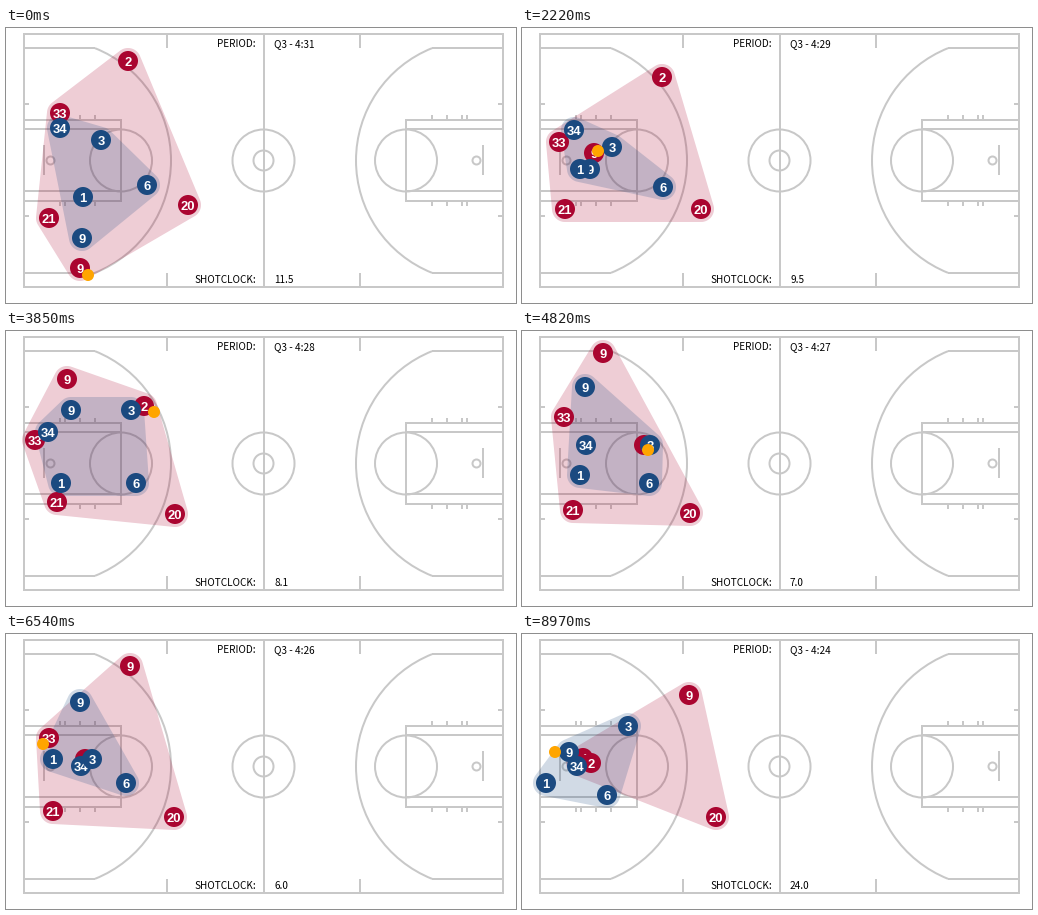
A matplotlib script that plays this animation: 510x275 px, repeating every 9.12 s.

```python
import numpy as np
import matplotlib.pyplot as plt
from matplotlib.animation import FuncAnimation
from matplotlib.patches import Arc, Circle, Polygon

W, H, DPI = 510, 275, 100
LOOP, TICK = 9120, 40
GREY, RED, BLUE, ORANGE = "#c8c8c8", "#aa0530", "#1b4a80", "#ffa500"
MID_X, MID_Y = 257.5, 132.5
HULL_R, DOT_R, BALL_R = 13, 10, 6

# The positions advance in 64 uneven steps per loop.
GROUPS = [(130, 1070), (1200, 2220), (2350, 3310), (3440, 4400),
          (4530, 5560), (5690, 6670), (6810, 7820), (7970, 8970)]
STARTS = np.concatenate([[0]] + [np.linspace(a, b, 8) for a, b in GROUPS])
STEPS = np.arange(len(STARTS))
KEYS = np.array([0, 16, 28, 35, 47, 57, 64])

# Waypoints at KEYS; later players are drawn on top.
REDS = {
    "33": [(54, 85), (37, 114), (29, 109), (42, 86), (43, 104), (55, 110), (61, 124)],
    "21": [(43, 190), (43, 181), (51, 171), (51, 179), (47, 177), (64, 128), (57, 129)],
    "20": [(182, 177), (179, 181), (169, 183), (168, 182), (168, 183), (175, 181), (194, 183)],
    "2": [(122, 33), (140, 49), (138, 75), (122, 114), (79, 125), (64, 128), (69, 129)],
    "9": [(74, 240), (72, 125), (61, 48), (81, 22), (124, 32), (150, 48), (167, 61)],
}
BLUES = {
    "34": [(54, 100), (52, 102), (42, 101), (64, 114), (75, 132), (66, 115), (55, 132)],
    "9": [(76, 210), (68, 141), (65, 79), (63, 56), (74, 68), (60, 127), (47, 118)],
    "1": [(77, 169), (58, 141), (55, 152), (58, 144), (47, 125), (41, 144), (24, 149)],
    "3": [(95, 112), (90, 119), (125, 79), (128, 114), (86, 125), (95, 113), (106, 92)],
    "6": [(141, 157), (141, 159), (130, 152), (127, 152), (120, 149), (93, 159), (85, 161)],
}


def track(points):
    """Monotone cubic path through the waypoints, sampled at every step."""
    p = np.array(points, float)
    h = np.diff(KEYS)[:, None]
    d = np.diff(p, axis=0) / h
    prod, total = d[:-1] * d[1:], d[:-1] + d[1:]
    inner = np.where(prod > 0, 2 * prod / np.where(total == 0, 1, total), 0)
    m = np.vstack([d[:1], inner, d[-1:]])
    i = np.clip(np.searchsorted(KEYS, STEPS, "right") - 1, 0, len(KEYS) - 2)
    t = ((STEPS - KEYS[i])[:, None]) / h[i]
    return ((1 + 2 * t) * (1 - t) ** 2 * p[i] + t * (1 - t) ** 2 * h[i] * m[i]
            + t * t * (3 - 2 * t) * p[i + 1] + t * t * (t - 1) * h[i] * m[i + 1])


red_paths = {n: track(p) for n, p in REDS.items()}
blue_paths = {n: track(p) for n, p in BLUES.items()}

# Who has the ball from which step, and where it is held.
HOLDS = [(0, red_paths["9"], (8, 7)), (16, red_paths["9"], (4, -2)),
         (20, red_paths["9"], (4, -2)), (25, red_paths["2"], (10, 6)),
         (28, red_paths["2"], (10, 6)), (35, red_paths["2"], (4, 5)),
         (43, red_paths["2"], (4, 5)), (47, red_paths["33"], (-6, 6)),
         (57, blue_paths["1"], (7, 1)), (64, blue_paths["9"], (-14, 0))]


def ball_at(step):
    for (s0, path0, off0), (s1, path1, off1) in zip(HOLDS, HOLDS[1:]):
        if step <= s1:
            w = (step - s0) / (s1 - s0)
            return (1 - w) * (path0[step] + off0) + w * (path1[step] + off1)


def clocks(step):
    shot = np.interp(step, [0, 8, 16, 28, 35, 47, 48, 57, 64],
                     [11.5, 11.02, 9.5, 8.1, 7.02, 6.03, 6, 4.97, 4.2])
    game = int(260 + shot)
    if step >= 61:
        shot = 24
    return f"Q3 - {game // 60}:{game % 60:02d}", f"{shot:.1f}"


ANGLES = np.linspace(0, 2 * np.pi, 240, endpoint=False)
DIRS = np.column_stack([np.cos(ANGLES), np.sin(ANGLES)])


def rounded_hull(points):
    """Convex hull of equal discs, from the farthest point in each direction."""
    return points[np.argmax(DIRS @ points.T, axis=1)] + HULL_R * DIRS


# The small margin keeps float rounding from losing a pixel.
fig = plt.figure(figsize=((W + 0.01) / DPI, (H + 0.01) / DPI), dpi=DPI,
                 facecolor="white")
ax = fig.add_axes([0, 0, 1, 1])
ax.set_xlim(0, W)
ax.set_ylim(H, 0)
ax.axis("off")


def px(size):
    return size * 72 / DPI


def line(*pts):
    ax.plot(*zip(*pts), color=GREY, lw=px(2), zorder=1,
            solid_capstyle="butt", solid_joinstyle="miter")


def ring(x, y, r):
    ax.add_patch(Circle((x, y), r, fill=False, ec=GREY, lw=px(2), zorder=1))


def half_court(fx, turn):
    line((fx(18), 20), (fx(89), 20))
    line((fx(18), 245), (fx(89), 245))
    a = np.degrees(np.arctan2(112.5, 45))
    ax.add_patch(Arc((fx(44), MID_Y), 242, 242, theta1=turn - a, theta2=turn + a,
                     ec=GREY, lw=px(2), zorder=1))
    for top, bottom in [(92, 173), (101.5, 163.5)]:
        line((fx(18), top), (fx(115), top))
        line((fx(18), bottom), (fx(115), bottom))
    line((fx(115), 91), (fx(115), 174))
    ring(fx(115), MID_Y, 31)
    ring(fx(44.5), MID_Y, 4)
    line((fx(38), 117), (fx(38), 147))
    for x in (54, 59, 74, 89):
        line((fx(x), 87), (fx(x), 92))
        line((fx(x), 173), (fx(x), 178))
    for y in (76, 188):
        line((fx(18), y), (fx(23), y))
    line((fx(161), 6), (fx(161), 20))
    line((fx(161), 245), (fx(161), 259))


line((18, 6), (497, 6), (497, 259), (18, 259), (18, 5))
line((MID_X, 6), (MID_X, 259))
ring(MID_X, MID_Y, 31)
ring(MID_X, MID_Y, 10)
half_court(lambda x: x, 0)
half_court(lambda x: 515 - x, 180)


def label(x, y, text, ha):
    return ax.text(x, y, text, ha=ha, va="baseline", color="black",
                   family="Noto Sans CJK JP", fontsize=px(10), zorder=2)


label(250, 19, "PERIOD:", "right")
label(250, 255, "SHOTCLOCK:", "right")
period = label(268, 19, "", "left")
shot_clock = label(268, 255, "", "left")


class Team:
    def __init__(self, paths, color, z):
        self.paths = np.stack(list(paths.values()), axis=1)
        self.hull = ax.add_patch(Polygon(np.zeros((3, 2)), fc=color, ec="none",
                                         alpha=0.2, zorder=3 + z / 100))
        self.dots, self.texts = [], []
        for i, name in enumerate(paths):
            self.dots.append(ax.add_patch(Circle((0, 0), DOT_R, fc=color, ec="none",
                                                 zorder=z + i)))
            self.texts.append(ax.text(0, 0, name, ha="center", va="baseline",
                                      color="white", family="Liberation Sans",
                                      weight="bold", fontsize=px(13), zorder=z + i + 0.5))

    def move(self, step):
        points = self.paths[step]
        self.hull.set_xy(rounded_hull(points))
        for (x, y), dot, text in zip(points, self.dots, self.texts):
            dot.center = x, y
            text.set_position((x, y + 4.7))


teams = [Team(red_paths, RED, 10), Team(blue_paths, BLUE, 20)]
ball = ax.add_patch(Circle((0, 0), BALL_R, fc=ORANGE, ec="none", zorder=40))


def update(frame):
    step = int(np.searchsorted(STARTS, frame * TICK + 25, "right")) - 1
    for team in teams:
        team.move(step)
    ball.center = tuple(ball_at(step))
    game, shot = clocks(step)
    period.set_text(game)
    shot_clock.set_text(shot)
    return []


anim = FuncAnimation(fig, update, frames=LOOP // TICK, interval=TICK,
                     init_func=lambda: update(0), repeat=True, repeat_delay=0)
plt.show()
```
